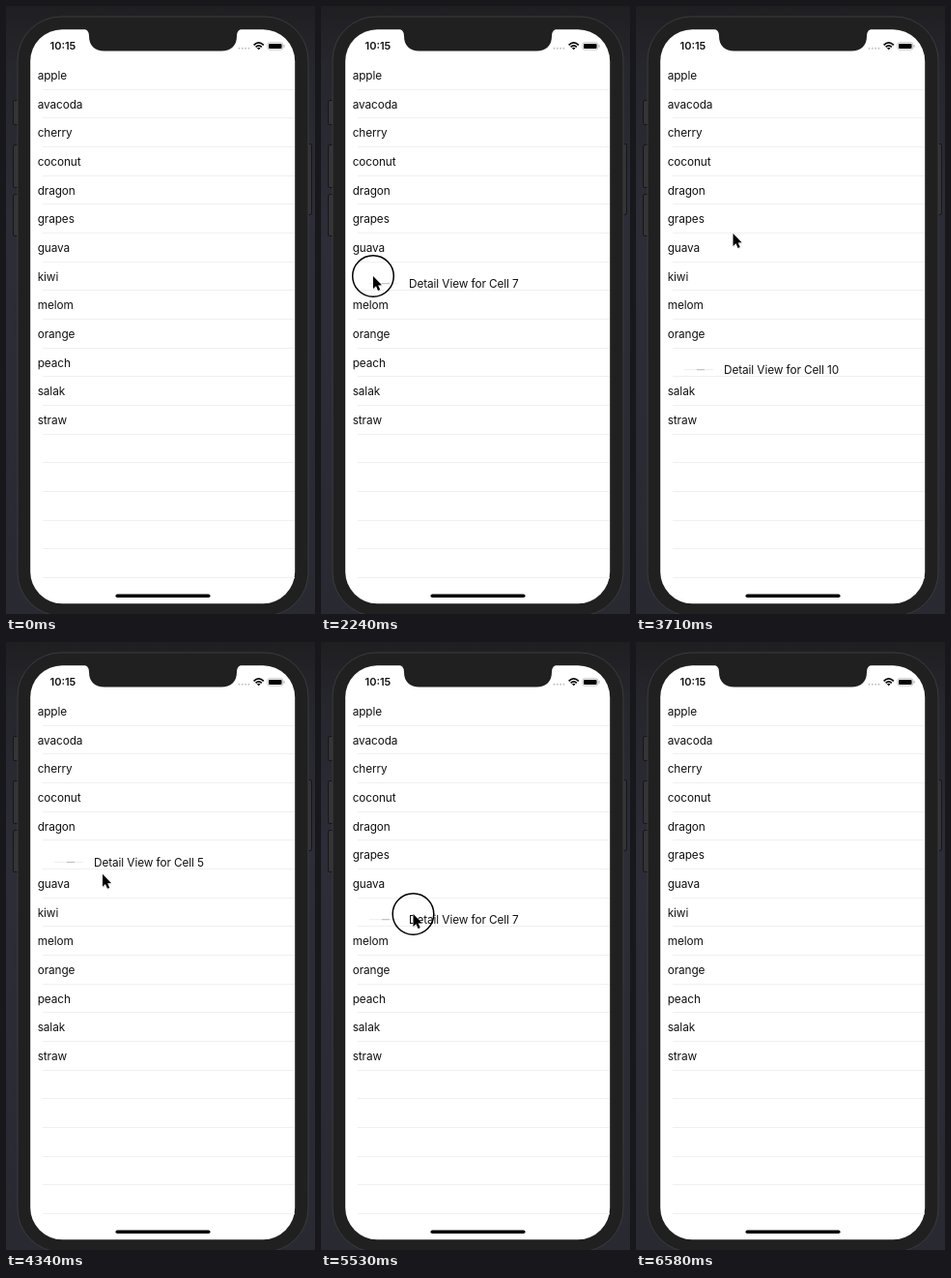
Write an HTML page that moves like this. It is 320 px wide and 628 px high and loops after 6.72 s.

```html
<!DOCTYPE html>
<html lang="en">
<head>
<meta charset="utf-8">
<title>Expanding list</title>
<style>
html, body { margin: 0; width: 100%; height: 100%; overflow: hidden; background: #2b2b35; }
svg { display: block; }
text { font: 400 11.8px Inter, Roboto, sans-serif; letter-spacing: -.09px; fill: #111; }
.clock { font-weight: 600; font-size: 11px; letter-spacing: 0; }
</style>
</head>
<body>
<svg width="320" height="628" viewBox="0 0 320 628">
  <defs>
    <linearGradient id="back" x2="0" y2="1">
      <stop stop-color="#1f1f22"/>
      <stop offset=".1" stop-color="#26262d"/>
      <stop offset=".35" stop-color="#2d2d38"/>
      <stop offset="1" stop-color="#292932"/>
    </linearGradient>
  </defs>
  <rect width="320" height="628" fill="url(#back)"/>
  <g fill="#343436" stroke="#161618">
    <rect x="7.5" y="97.5" width="7" height="25" rx="1.5"/>
    <rect x="7.5" y="143.5" width="7" height="44" rx="1.5"/>
    <rect x="7.5" y="194.5" width="7" height="43" rx="1.5"/>
    <rect x="309.5" y="142.5" width="7" height="73" rx="1.5"/>
  </g>
  <rect x="12" y="11" width="301" height="619" rx="45" fill="#202020" stroke="#3b3b3e"/>
  <rect x="25.2" y="24.2" width="274" height="593" rx="33" fill="#fff"/>
  <path d="M79 23Q86 24 86 31C86 41 92 46.5 102 46.5H223C233 46.5 239 41 239 31Q239 24 246 23Z" fill="#202020"/>

  <text class="clock" x="45.5" y="45">10:15</text>
  <path d="M241.5 43.8h11" stroke="#c4c4c6" stroke-width="2" stroke-linecap="round" stroke-dasharray="0 3.3"/>
  <path d="M256.6 40.3Q261.7 35.6 266.8 40.3M258.600 42.300Q261.700 39.500 264.800 42.300" fill="none" stroke="#000" stroke-width="1.7"/>
  <path d="M261.7 45.3L259.9 43.5Q261.7 42 263.5 43.5Z"/>
  <rect x="270.8" y="37.7" width="16" height="7.4" rx="2.2" fill="none" stroke="#aaa" stroke-width=".7"/>
  <rect x="272" y="38.9" width="13.6" height="5" rx="1.2"/>
  <rect x="287.5" y="40" width="1" height="2.8" rx=".5" fill="#aaa"/>

  <g id="list"></g>
  <g id="detail">
    <path d="M50 -4.5h30" stroke="#eee"/>
    <path d="M63 -4.5h8" stroke="#bbb"/>
    <text id="label" x="91"></text>
  </g>
  <rect x="113.5" y="607.5" width="98" height="3.5" rx="1.75"/>
  <circle id="ring" r="21.3" fill="none" stroke="#000" stroke-width="1.5"/>
  <g id="cursor">
    <path d="M.6 1V14.4L3.7 11.5 5.7 16 8 15 6 10.6 10 10.4Z" opacity=".13"/>
    <path d="M0 0V13L3 10.3 5 15 7.2 14 5.2 9.500 9 9.300Z" stroke="#fff" stroke-width=".8" paint-order="stroke"/>
  </g>
</svg>
<script>
const LOOP = 6720, STEP = 70, TOP = 57.2, PITCH = 29.67;
const ENTER = 280, EXIT = 6580;
const fruits = ["apple", "avacoda", "cherry", "coconut", "dragon", "grapes", "guava",
  "kiwi", "melom", "orange", "peach", "salak", "straw"];
const $ = id => document.getElementById(id);

const smooth = f => f * f * (3 - 2 * f);
const easeOut = f => 1 - (1 - f) ** 1.5;

// pointer moves: begin, end, x, y, easing
const moves = [
  [280, 560, 51.5, 294, easeOut],
  [700, 910, 54, 279, smooth],
  [2730, 3080, 89, 359, smooth],
  [3430, 3710, 100.5, 235, smooth],
  [4270, 4620, 95.5, 281, smooth],
  [5950, 6020, 100.5, 346, smooth],
  [6020, EXIT, 160, 630, easeOut]
];
// press and release times; a release toggles the row under the pointer
const taps = [[980, 1190], [2240, 2450], [3080, 3220], [3850, 3990], [4760, 4970], [5530, 5740]];

function pointer(t) {
  let x = 130, y = 573;
  for (const [begin, end, toX, toY, ease] of moves) {
    const f = ease(Math.min(1, Math.max(0, (t - begin) / (end - begin))));
    x += (toX - x) * f;
    y += (toY - y) * f;
  }
  return [x, y];
}

function openRow(t) {
  let open = -1;
  for (const [press, release] of taps) {
    if (t < release) break;
    const row = Math.floor((pointer(press)[1] - TOP) / PITCH);
    open = open === row ? -1 : row;
  }
  return open;
}

const baseline = row => 76 + row * PITCH;
let markup = "";
for (let i = 0; i < 18; i++)
  markup += `<rect x="38" y="${Math.floor(86 + i * PITCH)}" width="261" height="1" fill="#f0f0f1"/>`;
fruits.forEach((name, i) => {
  markup += `<text id="name${i}" x="32.7" y="${baseline(i)}">${name}</text>`;
});
$("list").innerHTML = markup;

function show(id, on) {
  $(id).style.visibility = on ? "visible" : "hidden";
}

function place(id, x, y) {
  $(id).setAttribute("transform", `translate(${x} ${y})`);
}

function draw(t) {
  const [x, y] = pointer(t), row = openRow(t);
  place("cursor", x, y);
  place("ring", x, y);
  show("cursor", t >= ENTER && t < EXIT);
  show("ring", taps.some(([press, release]) => t >= press && t < release));

  fruits.forEach((_, i) => show("name" + i, i !== row));
  show("detail", row >= 0);
  place("detail", 0, baseline(row) + 7.5);
  $("label").textContent = "Detail View for Cell " + row;
}

const start = performance.now();
function frame() {
  const t = (performance.now() - start) % LOOP;
  draw(Math.floor(t / STEP) * STEP);
  requestAnimationFrame(frame);
}
frame();
</script>
</body>
</html>
```
